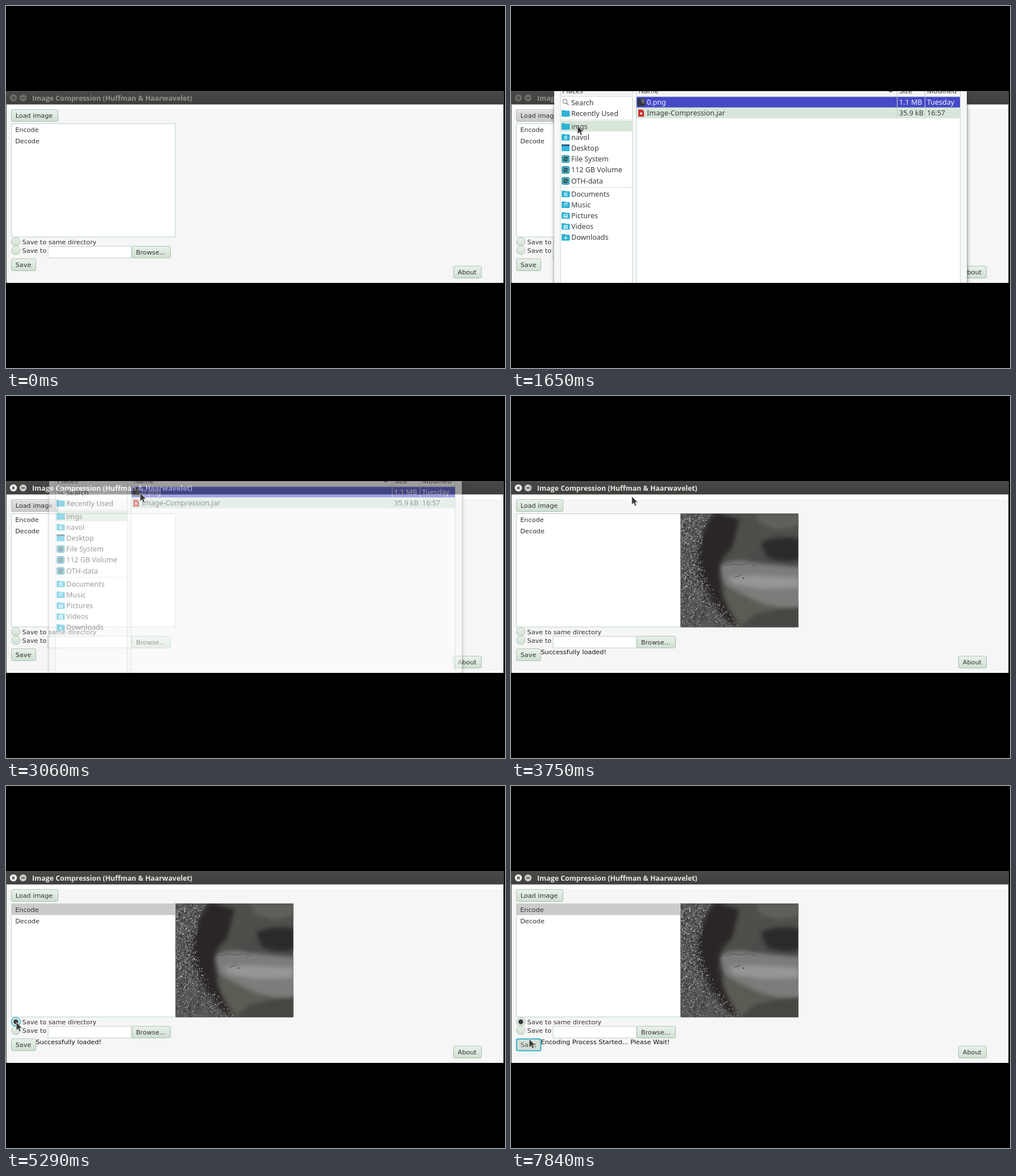
An HTML page for the animation above (8 s loop, 878 by 638 pixels).

```html
<!DOCTYPE html>
<html lang="en">
<head>
<meta charset="utf-8">
<title>Image compression demo</title>
<style>
html, body { margin: 0; width: 100%; height: 100%; overflow: hidden; background: #000; }
svg { display: block; width: 878px; height: 638px; }
text { white-space: pre; }
.ui { font: 11.25px "DejaVu Sans", sans-serif; fill: #333; }
.bar { font: bold 12.35px "Open Sans", sans-serif; }
.dlg { font: 12.5px "Noto Sans", sans-serif; fill: #3c3c3c; }
</style>
</head>
<body>
<svg id="stage" viewBox="0 0 878 638" xmlns="http://www.w3.org/2000/svg"></svg>
<script>
const LOOP = 8000;

// Cursor stops: time, x, y
const PATH = [
  [300, 196, 128], [810, 86.5, 166], [960, 60, 189], [1250, 60, 189],
  [1600, 117, 211], [2000, 117, 211], [2450, 236, 171], [3640, 236, 171],
  [4130, 56, 216], [4330, 56, 216], [4600, 72, 363], [4980, 17, 414],
  [5240, 17, 414], [5560, 33, 447], [6500, 33, 447], [6530, 32, 446]
];

// Parts that are visible only during some spans of the loop
const SPANS = {
  idleBar: [0, 2900], liveBar: [2900, LOOP],
  armed: [1060, 3240],
  photo: [3630, LOOP], loaded: [3630, 5710], started: [5710, LOOP],
  pickLive: [4230, 5150], pickIdle: [5150, LOOP],
  dot: [5150, LOOP], dotFocus: [5150, 5650], saveFocus: [5650, LOOP],
  cursor: [300, LOOP]
};

const rect = (x, y, w, h, fill, more = '') =>
  `<rect x="${x}" y="${y}" width="${w}" height="${h}" fill="${fill}" ${more}/>`;
const circle = (x, y, r, fill, more = '') =>
  `<circle cx="${x}" cy="${y}" r="${r}" fill="${fill}" ${more}/>`;
const path = (d, fill, more = '') => `<path d="${d}" fill="${fill}" ${more}/>`;
const text = (x, y, s, cls = 'ui', more = '') =>
  `<text x="${x}" y="${y}" class="${cls}" ${more}>${s}</text>`;
const group = (id, body, more = '') => `<g id="${id}" ${more}>${body}</g>`;
const line = (d, color, more = '') => path(d, 'none', `stroke="${color}" ${more}`);

function gradient(id, from, to) {
  return `<linearGradient id="${id}" x2="0" y2="1"><stop stop-color="${from}"/>` +
    `<stop offset="1" stop-color="${to}"/></linearGradient>`;
}

function button(x, y, w, h, label, fill = 'url(#green)') {
  return rect(x, y, w, h, fill, 'rx="2.5" stroke="#a9bfb0"') +
    line(`M${x + 2} ${y + 1}h${w - 4}`, '#f2f8f2') +
    text(x + 7.2, y + h / 2 + 4, label);
}

const radio = (x, y) =>
  circle(x, y, 7.6, 'url(#green)', 'stroke="#b2c2b5"');

function titleBar(id, ink, close, mini) {
  return group(id,
    circle(13, 162, 6.2, close) +
    line('M10.8 159.8l4.4 4.4m0-4.4l-4.4 4.4', '#3b3b3b', 'stroke-width="1.5"') +
    circle(30, 162, 6.2, mini) +
    line('M27 162h6', '#3b3b3b', 'stroke-width="1.6"') +
    text(46, 166.6, 'Image Compression (Huffman &amp; Haarwavelet)', 'bar', `fill="${ink}"`));
}

function seeded(seed) {
  return () => (seed = (seed * 16807) % 2147483647) / 2147483647;
}

// Grainy left edge of the picture, bounded by a curve
function grain(count, size, seed) {
  const rnd = seeded(seed);
  let d = '';
  for (let i = 0; i < count; i++) {
    const v = rnd(), y = 207 + v * 200;
    const edge = 28 + 150 * (v - 0.4) ** 2 + 26 * v;
    const x = 298 + rnd() * edge;
    d += `M${x.toFixed(1)} ${y.toFixed(1)}h${size}v${size}h-${size}z`;
  }
  return d;
}

function photo() {
  const soft = 'filter="url(#soft)"';
  return group('photo', `<g clip-path="url(#frame)">` +
    rect(298, 207, 208, 201, '#4b4c4a') +
    path('M370 207H510V252L440 262L400 300L360 290Z', '#4d504c', soft) +
    path('M430 207H510V228L470 236L440 226Z', '#5f605b', soft) +
    path('M345 345L400 335L510 372V410H390Z', '#5c5b55', soft) +
    path('M430 385L510 368V410H400Z', '#454743', soft) +
    path('M366 300Q390 284 430 294L510 302V372Q460 376 425 358L376 334Z', '#7b7b7a', soft) +
    path('M384 318L430 316L506 320V338L440 340L390 331Z', '#969695', soft) +
    path('M440 258Q470 244 510 252V288Q480 296 450 284Z', '#2b2b2c', soft) +
    path('M290 200H352Q330 240 322 280Q322 345 392 412H290Z', '#565656', soft) +
    path('M360 205L402 218L388 270Q360 290 368 326Q374 370 402 405L386 402Q338 352 328 300Q328 240 360 205Z', '#2a2827', soft) +
    path(grain(800, 1.4, 71), '#272727') +
    path(grain(620, 1.2, 913), '#a6a6a6') +
    path(grain(180, 1.3, 4057), '#dcdcdc') +
    line('M378 299l14 -3 12 2 14 -3m-26 25l12 -4m18 -20l8 4', '#50504e') +
    circle(409, 321, 1.2, '#3b3b3b') + circle(412, 363, 1.3, '#4a4a46') +
    '</g>');
}

function mainWindow() {
  return rect(0, 150, 876, 338, '#f6f6f6') +
    rect(0, 173, 876, 9, '#fff') +
    rect(0, 150, 876, 23.5, 'url(#bar)') +
    line('M0 150.5H876', '#5b5b59') +
    titleBar('idleBar', '#92928d', '#6c6c69', '#6c6c69') +
    titleBar('liveBar', '#e9e9e4', '#f3f3f0', '#c6c6c2') +
    button(9.5, 182.5, 82, 21, 'Load image') +
    group('armed', button(9.5, 182.5, 82, 21, 'Load image', 'url(#grey)')) +
    rect(9.5, 207.5, 288.5, 199.5, '#fff', 'stroke="#b9d6c7"') +
    group('pickIdle', rect(10, 208, 287.5, 19.5, '#cbcbcb')) +
    text(16.2, 222, 'Encode') + text(16.2, 242, 'Decode') +
    group('pickLive',
      rect(10, 208, 287.5, 19.5, '#0a9fc0') +
      rect(9.7, 207.5, 288, 199.7, 'none', 'stroke="#35b2cd" stroke-width="1.6"') +
      text(16.2, 222, 'Encode', 'ui', 'style="fill:#fff"')) +
    photo() +
    radio(17.3, 415.5) + radio(17.3, 430.5) +
    group('dotFocus', circle(17.3, 415.5, 7.8, 'none', 'stroke="#35b2cd" stroke-width="1.6"')) +
    group('dot', circle(17.3, 415.5, 4.2, '#3a3a3a')) +
    text(28.6, 419.5, 'Save to same directory') + text(28.6, 434.6, 'Save to') +
    rect(74, 423.5, 147, 20.5, '#fff', 'stroke="#bcd3c4"') +
    button(221.5, 423.5, 68, 20.5, 'Browse...') +
    button(9.5, 445.5, 43, 21, 'Save') +
    group('saveFocus',
      rect(9.8, 445.7, 42.6, 20.8, '#d3dfd5', 'rx="2.5" stroke="#35b2cd" stroke-width="2"') +
      text(16.7, 460, 'Save', 'ui', 'style="fill:#555"')) +
    text(52.4, 455, 'Successfully loaded!', 'ui', 'id="loaded" style="fill:#111"') +
    text(52.4, 455, 'Encoding Process Started... Please Wait!', 'ui', 'id="started" style="fill:#111"') +
    button(787.5, 458.5, 49, 21, 'About') +
    line('M0.5 150V488M875.5 150V488', '#4a4a48');
}

const folder = (y, glyph = '') =>
  path(`M89.5 ${y - 5}h5l1.5 1h7v9.5h-13.5z`, '#2cb3d6', 'stroke="#2cb3d6" stroke-linejoin="round"') +
  (glyph && line(glyph.replace('@', `M96.2 ${y + 0.5}`), '#e8fafd', 'stroke-width="1.2"'));
const drive = y =>
  rect(89.5, y - 6, 13, 12.5, '#49aebf', 'rx="2" stroke="#2d91a4"') +
  rect(92.5, y - 3.5, 7, 7.5, '#27505c') + line(`M94 ${y - 2}l4 4`, '#d9f2f5');

function places() {
  const rows = [
    ['Search', 170, ''],
    ['Recently Used', 189, folder(189)],
    ['imgs', 212, folder(212)],
    ['navol', 231, folder(231, '@m-2.5 0l2.5 -2.5 2.5 2.5m-4 0v3h3v-3')],
    ['Desktop', 250, rect(89, 244, 14, 12, '#35b9e6') + rect(89, 244, 14, 2.5, '#234a6b')],
    ['File System', 269.5, drive(269.5)],
    ['112 GB Volume', 288.7, drive(288.7)],
    ['OTH-data', 308, drive(308)],
    ['Documents', 331, folder(331, '@m-2 -2h4v5h-4zm1 2h2')],
    ['Music', 350, folder(350, '@m-2 3v-5l4 -1v5')],
    ['Pictures', 369, folder(369, '@m-3 -2h6v5h-6zm1 4l2 -2 2 2')],
    ['Videos', 388.3, folder(388.3, '@m-3 -2h6v5h-6zm2 0v5m2 -5v5')],
    ['Downloads', 407.5, folder(407.5, '@m0 -2.5v5m-2.5 -2.5l2.5 2.5 2.5 -2.5')]
  ];
  return rows.map(([name, y, icon]) => icon + text(106, y + 4.5, name, 'dlg')).join('') +
    circle(95, 168, 3.6, 'none', 'stroke="#777" stroke-width="1.1"') +
    line('M97.7 170.8l3.6 3.6', '#777', 'stroke-width="1.4"');
}

function dialog() {
  const white = 'style="fill:#f2f2ff"';
  return group('dialog',
    rect(77, 150, 725, 345, '#222', 'opacity=".75" filter="url(#shadow)"') +
    rect(76, 150, 726, 338, '#f6f8f6') +
    rect(87, 150, 126.5, 338, '#fff') + rect(220, 150, 570.5, 338, '#fff') +
    rect(87, 150, 126.5, 9.5, '#f3f4f3') + rect(220, 150, 570.5, 9.5, '#f3f4f3') +
    line('M87 159.5H213.5M220 159.5H790.5', '#d3dbd4') +
    line('M87 150V488M213.5 150V488M220.5 150V488M790.5 150V488', '#c6d8cb') +
    line('M216.5 352v8', '#b5b9b5', 'stroke-dasharray="1 2"') +
    line('M87 200.5H213M87 319.5H213', '#dde3de') +
    rect(87.5, 202, 126, 19, '#d7e6d8') +
    rect(221, 160, 569, 19, '#4549c6') +
    line('M221 160.5H790M221 178.5H790', '#8f92e2', 'stroke-dasharray="1 1"') +
    rect(221, 179, 569, 19, '#d7e7d9') +
    line('M679.5 150V198M728.5 150V198', '#c2cdc5') +
    text(90, 154.3, 'Places', 'dlg') + text(224.5, 154.3, 'Name', 'dlg') +
    text(683, 154.3, 'Size', 'dlg') + text(732, 154.3, 'Modified', 'dlg') +
    path('M664 149h8l-2 3h-4z', '#666') +
    rect(223, 163, 13, 13, '#32343c') + path('M228 164h7v7l-4 2z', '#62646a') +
    text(239, 174.2, '0.png', 'dlg', white) + text(683, 174.2, '1.1 MB', 'dlg', white) +
    text(732, 174.2, 'Tuesday', 'dlg', white) +
    path('M224 182.5h7l3 3v9.5h-10z', '#cf2b2e') + rect(227, 187.5, 4, 4, '#f3c9c9') +
    text(239, 193.4, 'Image-Compression.jar', 'dlg') +
    text(683, 193.4, '35.9 kB', 'dlg') + text(732, 193.4, '16:57', 'dlg') +
    places());
}

const cursor = group('cursor',
  path('M0 0V14.6L3.4 11.6L5.6 16.8L8.2 15.7L6 10.6L10.4 10.3Z', '#3a3a3a',
    'stroke="#dedede" stroke-width=".9" stroke-linejoin="round"'));

document.getElementById('stage').innerHTML =
  '<defs>' + gradient('green', '#e9f1ea', '#cfe0d2') + gradient('grey', '#e3e0e3', '#cbc8cb') +
  gradient('bar', '#484846', '#3f3f3e') +
  '<filter id="soft" x="-20%" y="-20%" width="140%" height="140%"><feGaussianBlur stdDeviation="3.5"/></filter>' +
  '<filter id="shadow"><feGaussianBlur stdDeviation="3"/></filter>' +
  '<clipPath id="view"><rect y="150" width="876" height="338"/></clipPath>' +
  '<clipPath id="frame"><rect x="298.5" y="207" width="207" height="200.5"/></clipPath></defs>' +
  rect(0, 0, 878, 638, '#000') +
  `<g clip-path="url(#view)">${mainWindow()}${dialog()}${cursor}</g>`;

const part = id => document.getElementById(id);
const parts = Object.entries(SPANS).map(([id, span]) => [part(id), ...span]);
const dialogNode = part('dialog'), cursorNode = part('cursor');
const ramp = (t, a, b) => Math.min(1, Math.max(0, (t - a) / (b - a)));

function cursorAt(t) {
  const i = PATH.findIndex(p => p[0] > t);
  if (i < 0) return PATH[PATH.length - 1].slice(1);
  if (i === 0) return PATH[0].slice(1);
  const [t0, x0, y0] = PATH[i - 1], [t1, x1, y1] = PATH[i];
  const k = ramp(t, t0, t1), e = k * k * (3 - 2 * k);
  return [x0 + (x1 - x0) * e, y0 + (y1 - y0) * e];
}

function draw(t) {
  for (const [node, from, to] of parts) {
    node.style.display = t >= from && t < to ? '' : 'none';
  }
  const shown = ramp(t, 1200, 1400) * (1 - ramp(t, 2900, 3220));
  dialogNode.style.opacity = shown;
  dialogNode.style.display = shown ? '' : 'none';
  cursorNode.setAttribute('transform', `translate(${cursorAt(t)})`);
}

const start = performance.now();
function tick() {
  draw((performance.now() - start) % LOOP);
  requestAnimationFrame(tick);
}
tick();
</script>
</body>
</html>
```
